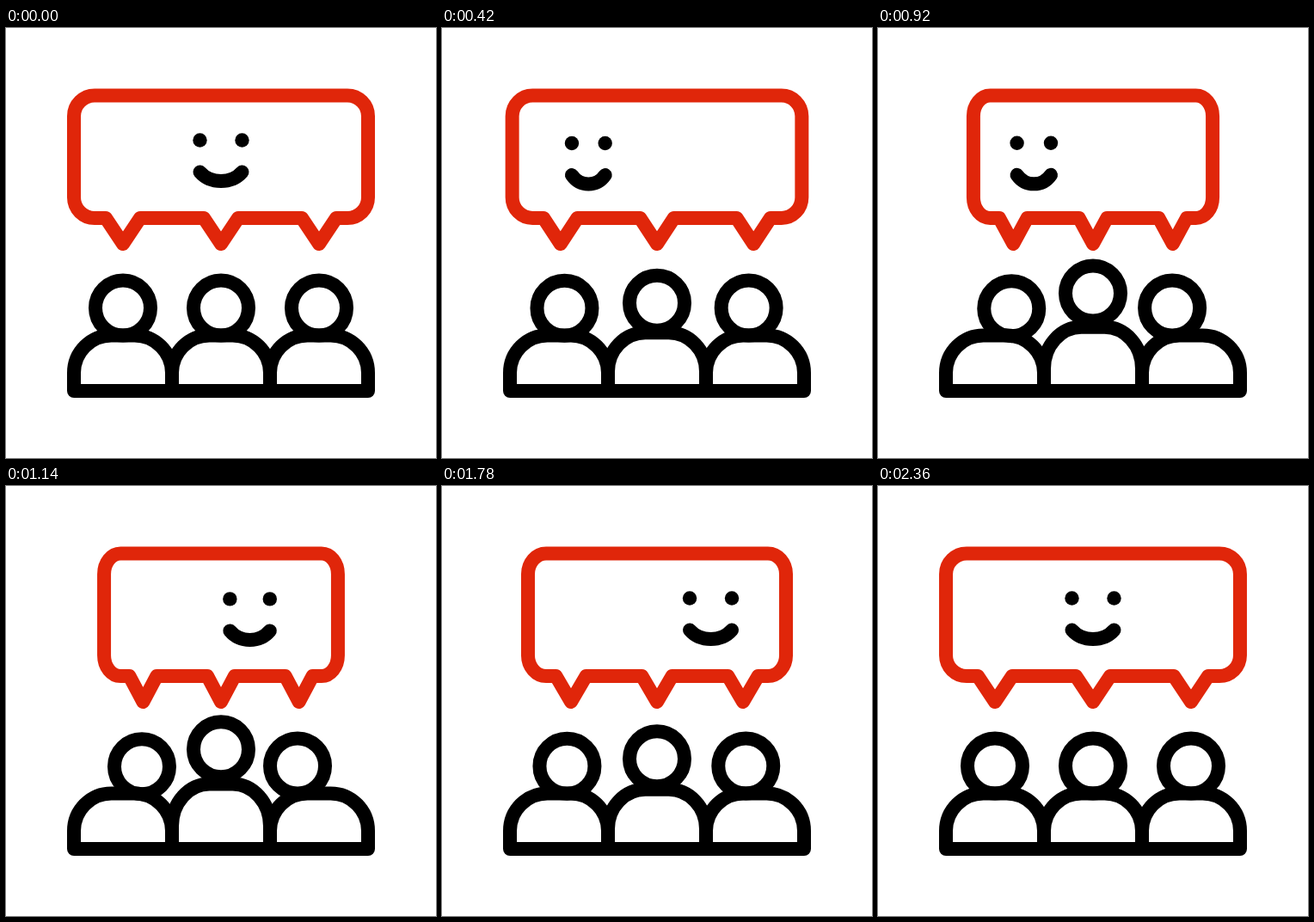
Recreate the animation shown at these times as an HTML page. Size 500 px wide and 500 px high, loop 2.4 s.

```html
<!DOCTYPE html>
<html lang="en">
<head>
<meta charset="utf-8">
<title>Group chat</title>
<style>
  html, body { margin: 0; width: 100%; height: 100%; overflow: hidden; background: #fff; }
  svg { display: block; width: 100%; height: 100%; }
  .line { fill: none; stroke: #000; stroke-width: 16; stroke-linejoin: round; stroke-linecap: round; }
  .bubble { stroke: #e0260a; vector-effect: non-scaling-stroke; }
</style>
</head>
<body>
<svg viewBox="0 0 500 500">
  <path id="bubble" class="line bubble" d="M-147 78.5H147A24 24 0 0 1 171 102.5V197A24 24 0 0 1 147 221H134L114 251L94 221H20L0 251L-20 221H-94L-114 251L-134 221H-147A24 24 0 0 1 -171 197V102.5A24 24 0 0 1 -147 78.5Z"/>
  <g id="face">
    <circle id="eyeL" cy="130.5" r="8.2"/>
    <circle id="eyeR" cy="130.5" r="8.2"/>
    <path id="mouth" class="line"/>
  </g>
  <g class="line">
    <path id="bodyL"/>
    <path id="bodyR"/>
    <path id="bodyM"/>
    <circle id="headL" cy="325.5" r="32"/>
    <circle id="headR" cx="364" cy="325.5" r="32"/>
    <circle id="headM" cx="250" cy="325.5" r="32"/>
  </g>
</svg>
<script>
  const LOOP = 2400;
  const $ = id => document.getElementById(id);
  const set = (id, attrs) => {
    for (const k in attrs) $(id).setAttribute(k, attrs[k]);
  };

  // Monotone cubic curve through [time, value] points, flat at both ends
  function curve(pts) {
    const slope = i => (pts[i + 1][1] - pts[i][1]) / (pts[i + 1][0] - pts[i][0]);
    const tan = pts.map((_, i) => {
      if (i === 0 || i === pts.length - 1) return 0;
      const a = slope(i - 1), b = slope(i);
      return a * b <= 0 ? 0 : 2 * a * b / (a + b);
    });
    return t => {
      let i = 0;
      while (i < pts.length - 2 && t > pts[i + 1][0]) i++;
      const [t0, v0] = pts[i], [t1, v1] = pts[i + 1];
      const w = t1 - t0, x = Math.min(1, (t - t0) / w), y = 1 - x;
      return v0 * (1 + 2 * x) * y * y + tan[i] * w * x * y * y
           + v1 * x * x * (3 - 2 * x) - tan[i + 1] * w * x * x * y;
    };
  }

  const gather = curve([[0, 0], [420, .293], [920, .875], [1155, 1], [1520, .773], [1780, .43], [2310, 0]]);
  const squeeze = curve([[0, 0], [420, .075], [550, .17], [920, .91], [1140, 1], [1240, 1.01],
                         [1520, .94], [1620, .88], [1780, .6], [2160, .03], [2400, 0]]);

  const ease = (t, start) => {
    const x = Math.max(0, Math.min(1, (t - start) / 450));
    return (1 - Math.cos(Math.PI * x)) / 2;
  };

  // Shoulders centred on x, with the top raised by lift
  function shoulders(x, lift) {
    const top = 357.5 - lift, side = 401 - lift / 2, ry = side - top;
    return `M${x - 57} 422V${side}A43.5 ${ry} 0 0 1 ${x - 13.5} ${top}` +
           `H${x + 13.5}A43.5 ${ry} 0 0 1 ${x + 57} ${side}V422Z`;
  }

  function draw(t) {
    set('bubble', { transform: `translate(250 0) scale(${1 - .205 * squeeze(t)} 1)` });

    // Face looks left, then right, then returns to the middle
    const a = ease(t, 0), b = ease(t, 840), c = ease(t, 1680);
    const left = a - b, right = b - c;
    const half = 24.5 - 5.2 * left;
    set('face', { transform: `translate(${250 - 80.5 * left + 71 * right} ${3.6 * left})` });
    set('eyeL', { cx: -half });
    set('eyeR', { cx: half });
    set('mouth', { d: `M${-half} 167.5C${-half / 2} 181.5 ${half / 2} 181.5 ${half} 167.5` });

    const g = gather(t);
    set('headL', { cx: 136 + 22 * g, cy: 325.5 + .8 * g });
    set('headR', { cx: 364 - 25 * g });
    set('headM', { cy: 325.5 - 19.3 * g });
    set('bodyM', { d: shoulders(250, 11 * g) });
  }

  set('bodyL', { d: shoulders(136, 0) });
  set('bodyR', { d: shoulders(364, 0) });

  function tick() {
    draw(performance.now() % LOOP);
    requestAnimationFrame(tick);
  }
  tick();
</script>
</body>
</html>
```
